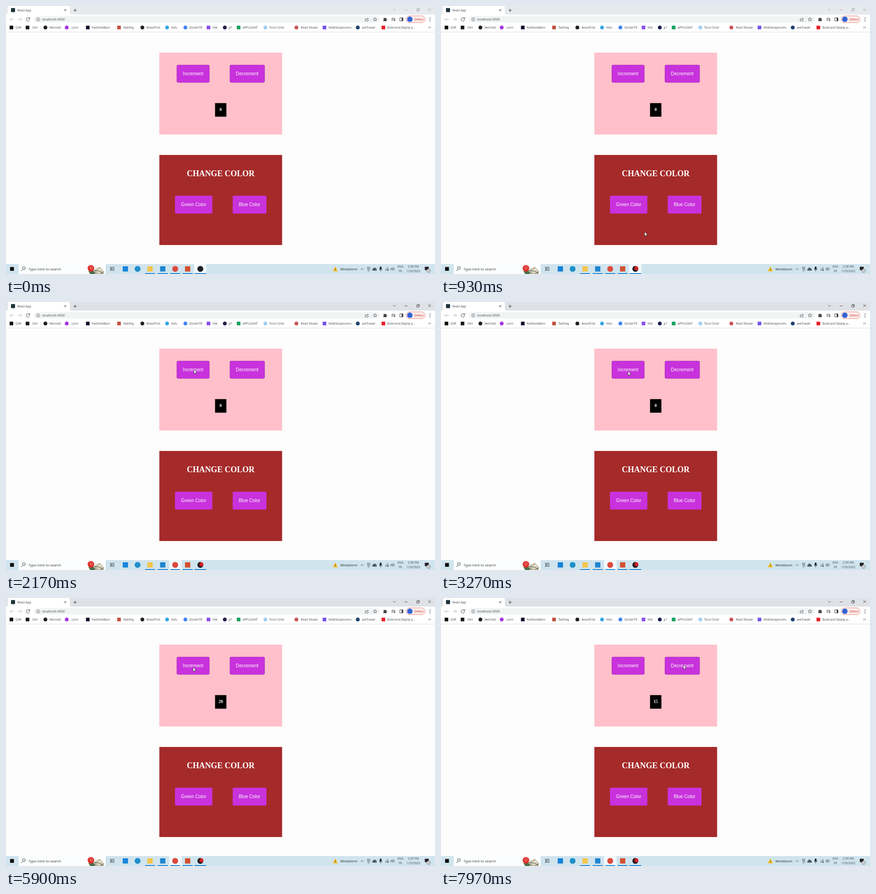
An HTML page for the animation above (8 s loop, 947 by 592 pixels).

```html
<!DOCTYPE html>
<html lang="en">
<head>
<meta charset="utf-8">
<title>React App</title>
<style>
  html, body { margin: 0; width: 100%; height: 100%; overflow: hidden; background: #fdfdfd; }
  svg { display: block; width: 947px; height: 592px; }
  text { font-family: "Open Sans", "Noto Sans", sans-serif; fill: #44474b; white-space: pre; }
  .button { font: 10.2px "Liberation Sans", Arial, sans-serif; fill: #fff; }
  .title { font: bold 18px "Liberation Serif", Times, serif; fill: #fff; }
  .count { font: bold 9.7px "Liberation Serif", Times, serif; fill: #fff; }
  .line { fill: none; stroke: #3c4043; stroke-width: 1; }
  .strip { fill: #e7eaed; }
  .focused .strip { fill: #dee1e6; }
  .controls { stroke: #9a9da1; stroke-width: .8; fill: none; }
  .focused .controls { stroke: #333; }
</style>
</head>
<body>
<svg id="stage" viewBox="0 0 947 592" xmlns="http://www.w3.org/2000/svg"></svg>
<script>
const LOOP = 8000;
const stage = document.getElementById('stage');

const rect = (x, y, w, h, fill, extra = '') =>
  `<rect x="${x}" y="${y}" width="${w}" height="${h}" fill="${fill}" ${extra}/>`;
const circle = (x, y, r, fill, extra = '') =>
  `<circle cx="${x}" cy="${y}" r="${r}" fill="${fill}" ${extra}/>`;
const text = (x, y, size, label, extra = '') =>
  `<text x="${x}" y="${y}" font-size="${size}" ${extra}>${label}</text>`;
const line = (d, extra = '') => `<path class="line" d="${d}" ${extra}/>`;
const shape = (d, fill, extra = '') => `<path d="${d}" fill="${fill}" ${extra}/>`;
const mark = (x, y, r, kind, fill) => kind === 'o'
  ? circle(x, y, r, fill)
  : rect(x - r, y - r, 2 * r, 2 * r, fill);
const button = (x, y, w, h, textX, label, border = 'none') =>
  rect(x, y, w, h, '#c832dc', `rx="2.5" stroke="${border}" stroke-width=".8"`) +
  `<text class="button" x="${textX}" y="${y + h / 2 + 3.6}">${label}</text>`;

// icon x, icon shape, icon colour, label x, label
const bookmarks = [
  [12, 's', '#111', 21, 'QVR'],
  [47.5, 's', '#16181d', 58, 'Olni'],
  [87, 'o', '#1b1f23', 96, 'MerinaD'],
  [134, 'o', '#a435e0', 144.5, 'Lorvi'],
  [180.5, 's', '#11112a', 189.5, 'FastNoteBarn'],
  [249.5, 's', '#c0503f', 258.5, 'Taskfray'],
  [301, 'o', '#222', 310.5, 'BravoPost'],
  [355.5, 'o', '#38a5e8', 365, 'Kelu'],
  [396, 'o', '#4285f4', 405, 'DockerTR'],
  [447, 's', '#8a4df0', 456, 'Vite'],
  [483, 'o', '#20204f', 491.5, 'p7'],
  [513.5, 's', '#18a05e', 522.5, 'APPLICANT'],
  [572.5, 'o', '#a4cdf0', 581, 'Torul Circle'],
  [641, 'o', '#c9565a', 651, 'React Router'],
  [703, 's', '#7451eb', 712, 'WideStudyrooms'],
  [776.5, 'o', '#1d426e', 785.5, 'axeTravail'],
  [833, 's', '#ec1c24', 842, 'Build and Deploy a...'],
];

function browser() {
  return rect(0, 0, 947, 58, '#fff') +
    rect(0, 0, 947, 19, '', 'class="strip"').replace('fill=""', '') +
    shape('M0 19Q4 19 4 15V4Q4 0 8 0H137Q141 0 141 4V15Q141 19 145 19Z', '#fff') +
    rect(11, 4.5, 9, 9, '#20333b', 'rx="1"') +
    text(25, 11.8, 6.5, 'React App') +
    line('M128.5 7L132.8 11.3M132.8 7L128.5 11.3') +
    line('M149 9.5H156M152.5 6V13') +
    `<path class="controls" d="M854.5 6.8L857.3 9.5L860.1 6.8M880 8.5H886.5
      M906.5 7H911V11.5H906.5ZM908 7V5.5H912.5V10H911M932.3 5.3L938 11M938 5.3L932.3 11"/>` +
    line('M17 29.5H9M12.5 26L9 29.5L12.5 33M26.5 29.5H34.5M31 26L34.5 29.5L31 33', 'style="stroke:#b4b7ba"') +
    line('M51.5 27A4 4 0 1 0 52.3 30.4M52.4 25V28.3H49') +
    rect(62, 22.5, 763, 14, '#f1f3f4', 'rx="7"') +
    circle(71, 29.5, 3.6, 'none', 'stroke="#5f6368" stroke-width=".8"') +
    line('M71 29V31.6M71 27.2V28.1', 'stroke-width=".8"') +
    text(80, 32, 7.4, 'localhost:3000') +
    line('M794.5 28H793V33H799.5V31M795 31Q795.5 28 799 28M797.5 26L800 28L797.5 30', 'style="stroke-width:.8"') +
    line('M814.5 25.5L815.7 28.2L818.5 28.5L816.4 30.4L817 33.2L814.5 31.8L812 33.2L812.6 30.4L810.5 28.5L813.3 28.2Z', 'style="stroke-width:.8"') +
    shape('M833 27H835.3Q836.5 24 838 27H840V29Q843 30 840 31.2V33.5H833V31.3Q835.3 30 833 29Z', '#44474b') +
    line('M851 27H858M851 29.5H856M851 32H854M858.5 27V32') +
    circle(857.5, 32, 1.4, '#44474b') +
    line('M869.3 26H876.3V33H869.3Z') + rect(873.3, 26, 3, 7, '#3c4043') +
    rect(883.5, 21.8, 41.5, 15, '#fdeeec', 'rx="7.5" stroke="#e58a82"') +
    circle(891.5, 29.3, 6, '#3165d8') +
    text(901.5, 31.9, 6.4, 'Défaut', 'style="fill:#c5332b"') +
    [26, 29.5, 33].map(y => circle(936, y, .9, '#44474b')).join('') +
    bookmarks.map(([x, kind, fill, labelX, label]) =>
      mark(x, 47.5, kind === 'o' ? 4.3 : 4, kind, fill) + text(labelX, 49.9, 6.35, label)).join('') +
    line('M932.5 45.5L934.5 47.5L932.5 49.5M935.3 45.5L937.3 47.5L935.3 49.5', 'style="stroke-width:.8"') +
    rect(0, 57, 947, 1, '#dadce0');
}

function page() {
  const edge = '#a31cb6';
  return rect(338.5, 103, 271, 181, '#ffc0cb') +
    button(377.2, 130.4, 71.6, 38.4, 390.3, 'Increment', edge) +
    button(494.4, 130.4, 76.4, 38.4, 507.6, 'Decrement', edge) +
    rect(461.5, 214.5, 25, 30, '#000') +
    '<text id="count" class="count" x="474" y="232" text-anchor="middle"></text>' +
    rect(338.5, 329, 271, 199, '#a52a2a') +
    '<text class="title" x="474" y="375.5" text-anchor="middle">CHANGE COLOR</text>' +
    button(373, 419, 82.5, 39.5, 386.6, 'Green Color') +
    button(500.5, 419, 74.5, 39.5, 513.8, 'Blue Color');
}

function searchArt() {
  return shape('M195 583L207 576L217 587L214 592H197Z', '#b9b39d') +
    shape('M198 584L208 579L214 586L204 591Z', '#e3dcc6') +
    shape('M182 586Q190 581 198 590L194 592H186Z', '#4c6b47') +
    line('M190 586Q203 581 215 591', 'style="stroke:#506346;stroke-width:1.4"') +
    circle(187.5, 579.5, 7.3, '#dd3530') +
    circle(188.5, 578.5, 3.6, '#f0655a') + circle(189, 578.5, 1.6, '#b91f22');
}

function taskbar() {
  const apps = [
    [263.5, 's', '#1583d8'], [290.5, 'o', '#1f8fc9'], [318, 's', '#f5c64a'],
    [346, 's', '#1f86d0'], [373.5, 'o', '#dc4a3c'], [401, 's', '#d3502f'], [429, 'o', '#1d1e22'],
  ];
  return rect(0, 570, 947, 22, '#d0e4ee') +
    rect(28, 570, 192, 22, '#fbfdfe') +
    rect(415, 570, 27.5, 22, '#f1f8fb', 'id="recorderLit"') +
    rect(360, 570, 27.5, 22, '#f1f8fb', 'id="browserLit"') +
    rect(9, 576.5, 8.5, 8.5, '#111') +
    circle(39.5, 579, 3, 'none', 'stroke="#222" stroke-width=".9"') + line('M37.3 581.3L34 585') +
    text(49.7, 584, 7.85, 'Type here to search', 'style="fill:#333"') +
    searchArt() +
    line('M230.5 576V578H235V576M230.5 585V583H235V585M230 580.5H235.5M238 576V585', 'style="stroke:#222"') +
    apps.map(([x, kind, fill]) => mark(x, 580.7, kind === 'o' ? 6.5 : 5.8, kind, fill)).join('') +
    circle(431.3, 579.5, 4.4, '#d81f26', 'id="recording"') +
    [307, 335, 362.5, 390, 416].map((x, i) => rect(x, 590.3, i === 4 ? 26 : 22, 1.7, '#0878d0')).join('') +
    shape('M727 575.5L732.5 586H721.5Z', '#f8bd16') + line('M727 579V582.6M727 583.5V584.7') +
    text(738, 584, 7.3, 'Windstorm', 'style="fill:#222"') +
    line('M783 582.5L786 579.5L789 582.5') +
    line('M798 577H803V580H798ZM799 580V585H803M801 582H804', 'style="stroke-width:.8"') +
    shape('M809.5 584Q808 581 811 580.5Q812 576.5 815 579.2Q818.5 579.5 817.8 584Z', '#55616a', 'stroke="#222" stroke-width=".7"') +
    rect(825, 575.5, 4, 6.5, '#222', 'rx="2"') + line('M824 580Q824 583.5 827 583.5T830 580M827 583V586') +
    line('M838 584.5Q838.5 578.5 844.5 578M840.5 584.5Q841 581 844.5 580.5', 'style="stroke-width:.9"') + circle(843.5, 583.6, 1.3, '#333') +
    line('M849.5 579.5H851L853 577.5V584.5L851 582.5H849.5ZM854.7 579.3Q856 581 854.7 582.7M856.3 578Q858.5 581 856.3 584', 'style="stroke-width:.8"') +
    text(870.7, 578.3, 6.3, 'ENG', 'text-anchor="middle"') +
    text(870.7, 588, 6.3, 'FR', 'text-anchor="middle"') +
    text(899, 578.3, 6.5, '', 'id="clock" text-anchor="middle"') +
    text(899, 588, 6.35, '1/25/2023', 'text-anchor="middle"') +
    shape('M924.5 576H933V583H928.5L926.5 585V583H924.5Z', '#222') +
    circle(933, 584.5, 4, '#f4f8fa', 'stroke="#333" stroke-width=".7"') +
    text(933, 586.8, 6.2, '9', 'text-anchor="middle"');
}

const pointer = shape('M0 0V9.2L2.1 7.3L3.5 10.3L5 9.6L3.6 6.7H6.5Z', '#fff',
  'id="pointer" stroke="#222" stroke-width=".7" stroke-linejoin="round"');
stage.innerHTML = rect(0, 0, 947, 592, '#fdfdfd') + browser() + page() + taskbar() + pointer;

const part = Object.fromEntries([...stage.querySelectorAll('[id]')].map(el => [el.id, el]));

// time, x, y
const path = [
  [420, 476, 592], [670, 467, 567], [870, 455, 520], [1400, 406, 336],
  [1850, 411, 190], [2170, 415, 149], [3000, 413, 153], [6250, 413, 153],
  [6670, 521, 134], [6950, 535, 148], [8000, 535, 148],
];
const counts = [[0, 0], [3350, 5], [4250, 10], [5050, 15], [5550, 20], [6050, 25], [7200, 20], [7700, 15]];
const RECORD_AT = 300, FOCUS_AT = 1200, MINUTE_AT = 2350;

const stepAt = (steps, t) => steps.findLast(([start]) => start <= t)[1];

function pointerAt(t) {
  const i = path.findIndex(([time]) => time > t);
  const [t0, x0, y0] = path[i - 1], [t1, x1, y1] = path[i];
  const k = (t - t0) / (t1 - t0);
  return [x0 + (x1 - x0) * k, y0 + (y1 - y0) * k];
}

const show = (el, on) => el.setAttribute('visibility', on ? 'visible' : 'hidden');

function draw(now) {
  const t = now % LOOP;
  const focused = t >= FOCUS_AT;
  stage.classList.toggle('focused', focused);
  show(part.browserLit, focused);
  show(part.recorderLit, !focused);
  show(part.recording, t >= RECORD_AT);
  part.count.textContent = stepAt(counts, t);
  part.clock.textContent = t < MINUTE_AT ? '2:38 PM' : '2:39 PM';
  const moving = t >= path[0][0];
  show(part.pointer, moving);
  if (moving) part.pointer.setAttribute('transform', `translate(${pointerAt(t)})`);
}

const start = performance.now();
function tick() {
  draw(performance.now() - start);
  requestAnimationFrame(tick);
}
tick();
</script>
</body>
</html>
```
